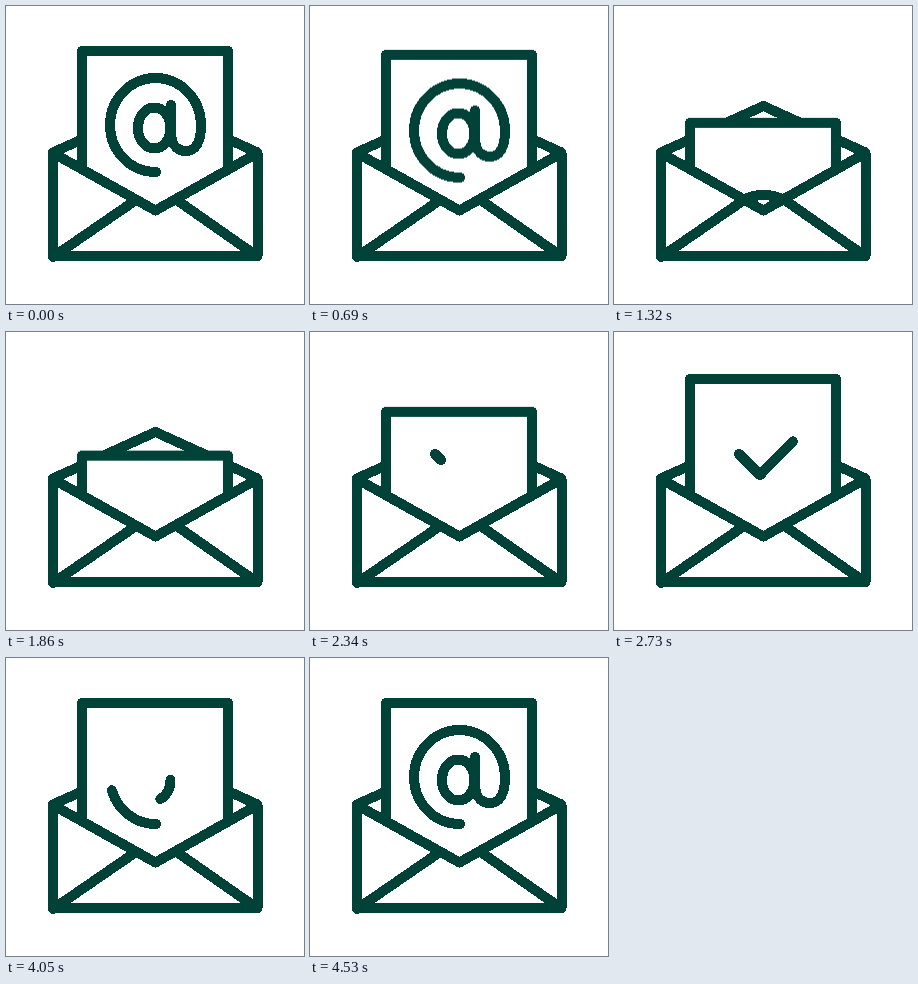
Recreate the animation shown at these times as an HTML page. Size 298 px wide and 298 px high, loop 5.4 s.

```html
<!DOCTYPE html>
<html lang="en">
<head>
<meta charset="utf-8">
<title>Envelope</title>
<style>
  html, body { margin: 0; width: 100%; height: 100%; overflow: hidden; background: #fff; }
  svg { display: block; width: 100%; height: 100%; shape-rendering: crispEdges; }
  path { stroke: #004238; stroke-width: 10; stroke-linecap: round; stroke-linejoin: round; fill: none; }
  .paper { fill: #fff; }
  .draw { stroke-dasharray: 100 200; }

  /* Percentages are milliseconds / 54 */
  .sheet, .at, .at .draw, .check, .ray { animation: 5400ms linear infinite; }
  .sheet { animation-name: sheet; }
  .at { animation-name: at-move, at-show; }
  .at .draw { animation-name: at-draw; }
  .check { animation-name: check-draw, check-show; }
  .ray { animation-name: ray-draw, ray-show; }

  @keyframes sheet {
    0% { transform: none; }
    8.333% { transform: none; animation-timing-function: cubic-bezier(.6, 0, .4, 1); }
    30.556% { transform: translateY(80px); }
    31.667% { transform: translateY(80px); animation-timing-function: cubic-bezier(.6, 0, .4, 1); }
    53.889%, 100% { transform: none; }
  }
  @keyframes at-move {
    0% { transform: none; }
    8.333% { transform: none; animation-timing-function: cubic-bezier(.6, 0, .4, 1); }
    32.778% { transform: translateY(142px); animation-timing-function: step-end; }
    40%, 100% { transform: none; }
  }
  @keyframes at-show {
    0% { visibility: visible; animation-timing-function: step-end; }
    32.778% { visibility: hidden; animation-timing-function: step-end; }
    71.2%, 100% { visibility: visible; }
  }
  @keyframes at-draw {
    0% { stroke-dashoffset: 0; animation-timing-function: step-end; }
    40% { stroke-dashoffset: 100; }
    71.111% { stroke-dashoffset: 100; animation-timing-function: cubic-bezier(.42, 0, .58, 1); }
    83.889%, 100% { stroke-dashoffset: 0; }
  }
  @keyframes check-draw {
    0%, 40.741% { stroke-dashoffset: 100; animation-timing-function: cubic-bezier(.4, 0, .4, 1); }
    53.889% { stroke-dashoffset: 0; }
    63.704% { stroke-dashoffset: 0; animation-timing-function: cubic-bezier(.42, 0, .58, 1); }
    71.296%, 100% { stroke-dashoffset: -100; }
  }
  @keyframes check-show {
    0% { visibility: hidden; animation-timing-function: step-end; }
    40.9% { visibility: visible; animation-timing-function: step-end; }
    71.2%, 100% { visibility: hidden; }
  }
  @keyframes ray-draw {
    0%, 52.778% { stroke-dashoffset: 100; animation-timing-function: ease-in-out; }
    58.333% { stroke-dashoffset: 0; animation-timing-function: ease-in-out; }
    63.2%, 100% { stroke-dashoffset: -99.5; }
  }
  @keyframes ray-show {
    0% { visibility: hidden; animation-timing-function: step-end; }
    52.8% { visibility: visible; animation-timing-function: step-end; }
    63.889%, 100% { visibility: hidden; }
  }
</style>
</head>
<body>
<svg viewBox="0 0 298 298">
  <clipPath id="above-base"><rect width="298" height="250"/></clipPath>

  <path d="M47 146.500 149.500 100 251.500 146.500"/>

  <path class="sheet paper" d="M76 169V45H222V169"/>

  <g clip-path="url(#above-base)">
    <g class="at">
      <path class="draw" pathLength="100" d="M150 166A45.500 47 0 1 1 195 119C195 135 190 145 180 145S165 137 165 126V99"/>
      <path class="draw" pathLength="100" d="M164.500 122A16.250 20.500 0 1 1 132 122A16.250 20.500 0 1 1 164.500 122"/>
    </g>
  </g>

  <path class="check draw" pathLength="100" d="M125 122 146 143 183 105"/>
  <path class="ray draw" pathLength="100" d="M131 99 120 82"/>
  <path class="ray draw" pathLength="100" d="M149 90V67"/>
  <path class="ray draw" pathLength="100" d="M167 98 178 81"/>

  <path class="paper" d="M47 147 149.500 204.500 251.500 147V250H47Z"/>
  <path d="M47 251 130 194M251.500 250.500 170 193.500"/>
</svg>
</body>
</html>
```
